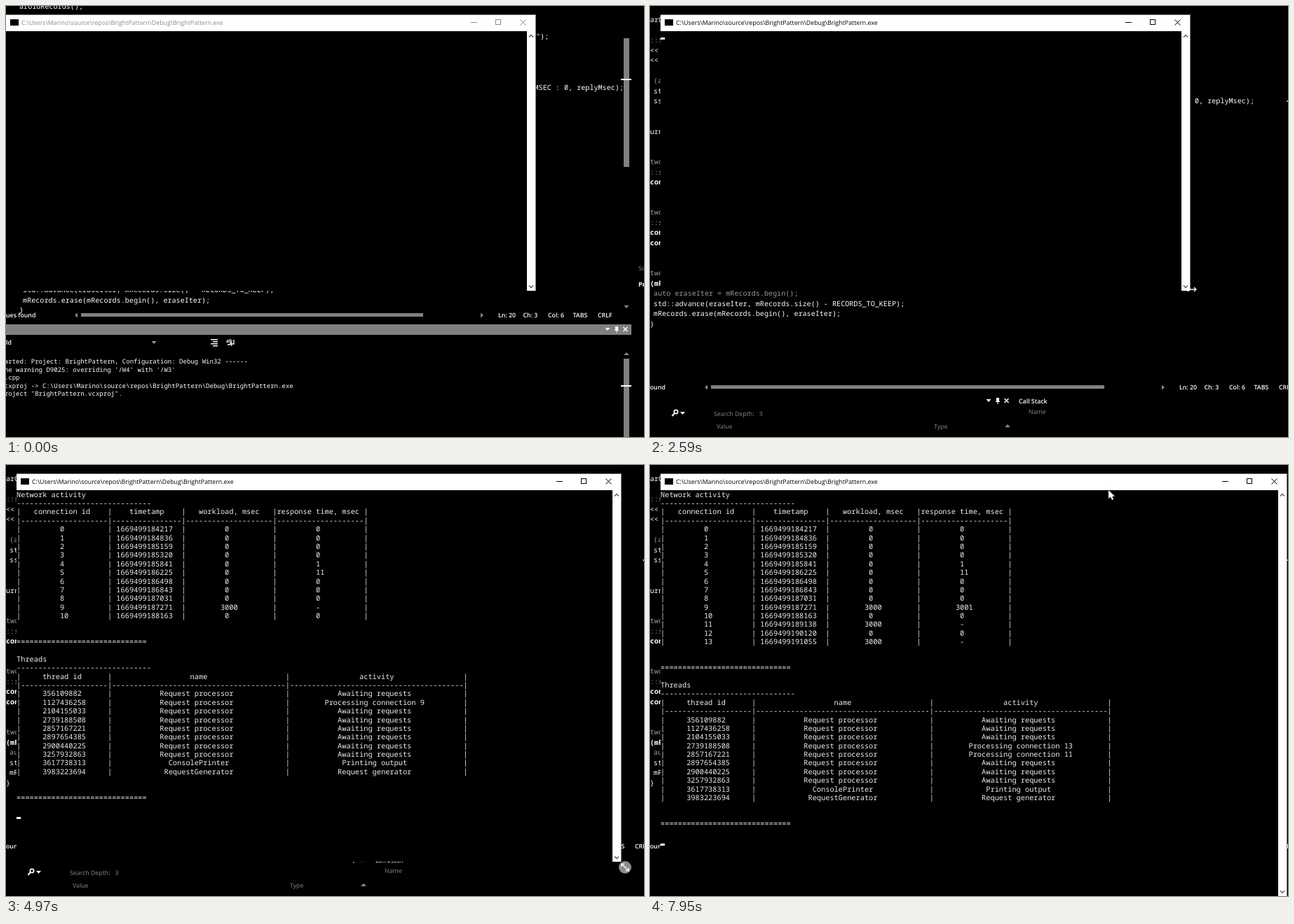
An HTML page with a canvas for the animation above (8000 ms loop, 910 px wide and 616 px high).

```html
<!DOCTYPE html>
<html>
<head>
<meta charset="utf-8">
<style>
html, body { margin: 0; width: 910px; height: 616px; overflow: hidden; background: #000; }
canvas { display: block; }
</style>
</head>
<body>
<canvas id="stage" width="910" height="616"></canvas>
<script>
const ctx = document.getElementById('stage').getContext('2d');
ctx.textRendering = 'geometricPrecision';

const LOOP = 8000, CELL = 6.19, ROW = 12.38, TOP = 36, DIM = '#888';
const DRAG = 1200, DRAG_END = 1580, RESIZE = 4230, RESIZE_END = 5640;
const REDRAW = 110, WORK = 3001, CLOCK = 1669499183311;
const PATH = 'C:\\Users\\Marino\\source\\repos\\BrightPattern\\Debug\\BrightPattern.exe';

const stamps = ('184217 184836 185159 185320 185841 186225 186498 186843 187031 187271 ' +
  '188163 189138 190120 191055').split(' ').map(s => '1669499' + s);
const threadIds = ('356109882 1127436258 2104155033 2739188508 2857167221 ' +
  '2897654385 2900440225 3257932863 3617738313 3983223694').split(' ');
const arrivals = stamps.map(s => s - CLOCK);
const isSlow = id => id > 8 && id % 2 === 1;
const isDone = (id, t) => t >= arrivals[id] + WORK;
const events = arrivals.concat(arrivals.filter((a, id) => isSlow(id)).map(a => a + WORK));

const listing = `arOldRecords();

::s
<<
<<

 (a
 st
 ss


urn


two
::s
con


two
::s
con
con


two
(mR
 auto eraseIter = mRecords.begin();
 std::advance(eraseIter, mRecords.size() - RECORDS_TO_KEEP);
 mRecords.erase(mRecords.begin(), eraseIter);
}`.split('\n');

const ramp = (t, from, to) => Math.min(1, Math.max(0, (t - from) / (to - from)));
const mix = (a, b, f) => a + (b - a) * f;

function rect(x, y, w, h, color) {
  ctx.fillStyle = color;
  ctx.fillRect(x, y, w, h);
}

function path(color, width, ...lines) {
  ctx.strokeStyle = color;
  ctx.lineWidth = width;
  ctx.beginPath();
  for (const [x, y, ...rest] of lines) {
    ctx.moveTo(x, y);
    for (let i = 0; i < rest.length; i += 2) ctx.lineTo(rest[i], rest[i + 1]);
  }
  ctx.stroke();
}

function poly(color, ...p) {
  ctx.fillStyle = color;
  ctx.beginPath();
  for (let i = 0; i < p.length; i += 2) ctx.lineTo(p[i], p[i + 1]);
  ctx.closePath();
  ctx.fill();
}

function disc(x, y, r, color) {
  ctx.fillStyle = color;
  ctx.beginPath();
  ctx.arc(x, y, r, 0, 7);
  ctx.fill();
}

function mono(text, x, y, pitch, color, weight = 400) {
  ctx.font = `${weight} ${pitch / 0.6}px "Noto Sans Mono", monospace`;
  ctx.fillStyle = color;
  [...text].forEach((c, i) => c !== ' ' && ctx.fillText(c, x + i * pitch, y));
}

function label(text, x, y, color = '#fff', weight = 600, size = 8.8) {
  ctx.font = `${weight} ${size}px "Open Sans", sans-serif`;
  ctx.fillStyle = color;
  ctx.fillText(text, x, y + 3.2);
}

const code = (text, x, y, color = '#fff', weight) => mono(text, x, y + 3.3, 6.07, color, weight);
const down = (x, y, c = '#fff') => poly(c, x - 3.5, y - 2, x + 3.5, y - 2, x, y + 2);
const up = (x, y) => poly(DIM, x - 4, y + 2, x + 4, y + 2, x, y - 2);
const side = (x, y, dir) => poly(DIM, x + 2 * dir, y, x - 2 * dir, y - 3.5, x - 2 * dir, y + 3.5);
const cross = (x, y, r, c, w) => path(c, w, [x - r, y - r, x + r, y + r], [x - r, y + r, x + r, y - r]);

function panelButtons(x, y) {
  down(x, y);
  rect(x + 11, y - 4, 4, 5, '#fff');
  rect(x + 10, y + 1, 6, 1, '#fff');
  rect(x + 12.5, y + 2, 1, 3, '#fff');
  cross(x + 25.5, y, 3, '#fff', 1.5);
}

function statusLine(y, text, barX, barEnd) {
  label(text, 0, y);
  side(barX - 7, y, -1);
  rect(barX, y - 3, barEnd - barX, 5, '#808080');
  side(barEnd + 84, y, 1);
  ['Ln: 20', 'Ch: 3', 'Col: 6', 'TABS', 'CRLF'].forEach((s, i) => label(s, barEnd + 107 + i * 35.5, y));
}

function editor(dx, dy) {
  listing.forEach((s, i) => {
    const color = /^(two|::s| \(a| auto)/.test(s) ? '#999' : '#fff';
    const weight = /^(con|\(mR)/.test(s) ? 600 : 400;
    code(s, dx - (s[0] === ' '), 20 + dy + i * 14.48, color, weight);
  });
  code('");', 737 + dx, 63.5 + dy);
  code('MSEC : 0, replyMsec);', 734.5 + dx, 136 + dy);
}

function scrollTrack(y, height, markY) {
  rect(881, y, 8, height, '#808080');
  rect(877, markY, 15, 2, '#fff');
}

function buildLayout() {
  editor(19, -19.5);
  scrollTrack(46, 184, 104);
  label('Solution', 902, 375, DIM, 400);
  label('Properties', 902, 398, '#fff', 700);
  down(885, 430, DIM);
  statusLine(442, 'ues found', 107, 595);

  rect(0, 455, 892, 15, '#808080');
  panelButtons(858, 462);
  label('ld', 0, 481);
  down(211, 481, '#999');
  for (let i = 0; i < 4; i++) rect(292 + i % 2 * 3, 476 + i * 3, 10 - i % 2 * 3, 1.5, '#fff');
  label('ab', 314, 478, '#fff', 700, 7);
  path('#fff', 1.3, [316, 484, 319, 484], [325, 477, 325, 483, 320, 483], [322, 480.5, 319.5, 483, 322, 485.5]);
  ['arted: Project: BrightPattern, Configuration: Debug Win32 ------',
    "ne warning D9025: overriding '/W4' with '/W3'", '.cpp',
    'cxproj -> ' + PATH, 'roject "BrightPattern.vcxproj".'
  ].forEach((s, i) => mono(s, -2.2, 511 + i * 11.6, 5.42, '#fff'));
  up(885, 497);
  scrollTrack(504, 112, 542);
}

function debugLayout() {
  editor(0, 0);
  rect(908.5, 135, 2, 2, '#ccc');
  statusLine(545, 'ound', 87, 648);

  panelButtons(483, 564);
  label('Call Stack', 526, 565);
  label('Name', 540, 580, DIM, 400);
  disc(37, 580, 3.5, '#fff');
  disc(37, 580, 1.8, '#000');
  path('#fff', 2, [35, 582, 31.5, 586]);
  down(46.5, 582);
  label('Search Depth:   3', 91, 583, DIM, 400);
  label('Value', 95, 601, DIM, 400);
  label('Type', 405, 601, DIM, 400);
  up(510, 600);
}

function center(text, width) {
  text = String(text);
  return text.padStart(text.length + ((width - text.length) >> 1)).padEnd(width);
}

const tableRow = (widths, cells) => '|' + cells.map((c, i) => center(c, widths[i])).join('|') + '|';

function table(title, widths, head, rows) {
  return [title, '-'.repeat(31), tableRow(widths, head), tableRow(widths, widths.map(w => '-'.repeat(w))),
    ...rows.map(r => tableRow(widths, r)), '', '', '='.repeat(30), ''];
}

function report(t) {
  const open = stamps.slice(0, arrivals.filter(a => a <= t).length);
  const rows = open.map((stamp, id) => isSlow(id)
    ? [id, stamp, 3000, isDone(id, t) ? WORK : '-']
    : [id, stamp, 0, { 4: 1, 5: 11 }[id] || 0]);
  const worker = { 1: 9, 4: 11, 3: 13 };
  const threads = threadIds.map((thread, i) => {
    if (i === 8) return [thread, 'ConsolePrinter', 'Printing output'];
    if (i === 9) return [thread, 'RequestGenerator', 'Request generator'];
    const id = worker[i], busy = id < open.length && !isDone(id, t);
    return [thread, 'Request processor', busy ? 'Processing connection ' + id : 'Awaiting requests'];
  });
  return [
    ...table('Network activity', [20, 16, 20, 20],
      ['connection id', 'timetamp', 'workload, msec', 'response time, msec'], rows),
    ...table('Threads', [20, 40, 40], ['thread id', 'name', 'activity'], threads), ''];
}

function consoleText(t, left, bottom) {
  if (t < arrivals[0]) return;
  const cleared = events.some(e => t >= e && t < e + REDRAW) || (t > RESIZE_END && t < arrivals[11]);
  const lines = cleared ? [''] : report(t);
  const visible = t < 4900 ? 30 : Math.floor((bottom - TOP) / ROW);
  const shown = lines.slice(-visible);
  shown.forEach((s, i) => mono(s, left, Math.round(TOP + 9.7 + i * ROW), CELL, '#eee'));
  rect(left, Math.round(TOP + 9.3 + (shown.length - 1) * ROW), 6, 3, '#fff');
}

const resizing = t => Math.cbrt(ramp(t, RESIZE, 5720));

function bounds(t, grown = resizing(t)) {
  const left = 15 * ramp(t, DRAG, DRAG_END), last = ramp(t, 5920, 6100);
  return [left, left + 756 + 135 * grown + 3 * last, 407 + 202 * grown + 7 * last].map(Math.round);
}

function scrollBar(right, bottom, edge = right) {
  const x = right - 13;
  rect(x, TOP, edge - x, bottom - TOP, '#fff');
  for (const [y, dir] of [[43, 1], [bottom - 6, -1]]) {
    path('#555', 1.3, [x + 3, y + 1.5 * dir, x + 6, y - 1.5 * dir, x + 9, y + 1.5 * dir]);
  }
}

function consoleWindow(t) {
  const [left, right, bottom] = bounds(t);
  const ink = t < 150 ? '#8a8a8a' : '#000';
  rect(left, TOP, right - left, bottom - TOP, '#000');
  consoleText(t, left, bottom);

  if (t >= RESIZE && t < RESIZE + 190) {
    // earlier scroll bars linger while the resize starts
    rect(right - 14, TOP, 14, bottom - TOP, '#fff');
    for (const part of [0.1, 0.5]) {
      const [, r, b] = bounds(t, resizing(t) * part);
      scrollBar(r, b, part === 0.5 ? right : r);
    }
  } else {
    scrollBar(right, bottom);
  }

  rect(left, 12, right - left, 24, '#fff');
  rect(left, 12, right - left, 1, '#777');
  rect(right - 1, 12, 1, bottom - 12, '#777');
  rect(left + 6, 19, 12, 9, '#000');
  label(PATH, left + 22, 24, ink, 400);
  path(ink, 1, [right - 93, 23.5, right - 84, 23.5]);
  ctx.strokeRect(right - 57.5, 19.5, 7, 7);
  cross(right - 18.5, 23.5, 4, ink, 1);
}

function doubleArrow(x, y, angle) {
  ctx.save();
  ctx.translate(x, y);
  ctx.rotate(angle);
  path('#fff', 1.3, [-7, 0, 7, 0], [-4, -3, -7, 0, -4, 3], [4, -3, 7, 0, 4, 3]);
  ctx.restore();
}

function arrow(x, y) {
  const p = [0, 0, 0, 12, 3, 9.5, 5, 14, 7, 13, 5.2, 8.7, 9, 8.7].map((v, i) => v + (i % 2 ? y : x));
  path('#000', 1.5, [...p, x, y]);
  poly('#fff', ...p);
}

function mouse(t) {
  if (t < 920) return;
  const [left, right, bottom] = bounds(t);
  if (t < 1820) {
    const reach = ramp(t, DRAG_END, 1750);
    const x = mix(256 + left, 770, reach), y = mix(26, 405, reach);
    if (!reach) {
      ctx.strokeStyle = '#999';
      ctx.lineWidth = 2.5;
      ctx.beginPath();
      ctx.arc(x + 11, y + 1, 4.5, 0, 7);
      ctx.stroke();
    }
    arrow(x, y);
  } else if (t < RESIZE - 70) {
    doubleArrow(right + 1, bottom - 2, t < 2660 ? 0 : Math.PI / 4);
  } else if (t < 6810) {
    // the pointer runs ahead of the window corner
    const [, x, y] = bounds(Math.min(t + 130, 5900));
    disc(x - 1, y - 1, 9, '#8a8a8a');
    doubleArrow(x - 1, y - 1, Math.PI / 4);
  } else {
    const a = ramp(t, 6810, 7070), b = ramp(t, 7470, 7620), c = ramp(t, 7780, 7950);
    arrow(mix(mix(mix(905, 705, a), 487, b), 654, c), mix(mix(mix(609, 410, a), 285, b), 36, c));
  }
}

function draw() {
  const t = performance.now() % LOOP;
  rect(0, 0, 910, 616, '#000');
  t < 290 ? buildLayout() : debugLayout();
  consoleWindow(t);
  mouse(t);
  requestAnimationFrame(draw);
}
draw();
</script>
</body>
</html>
```
